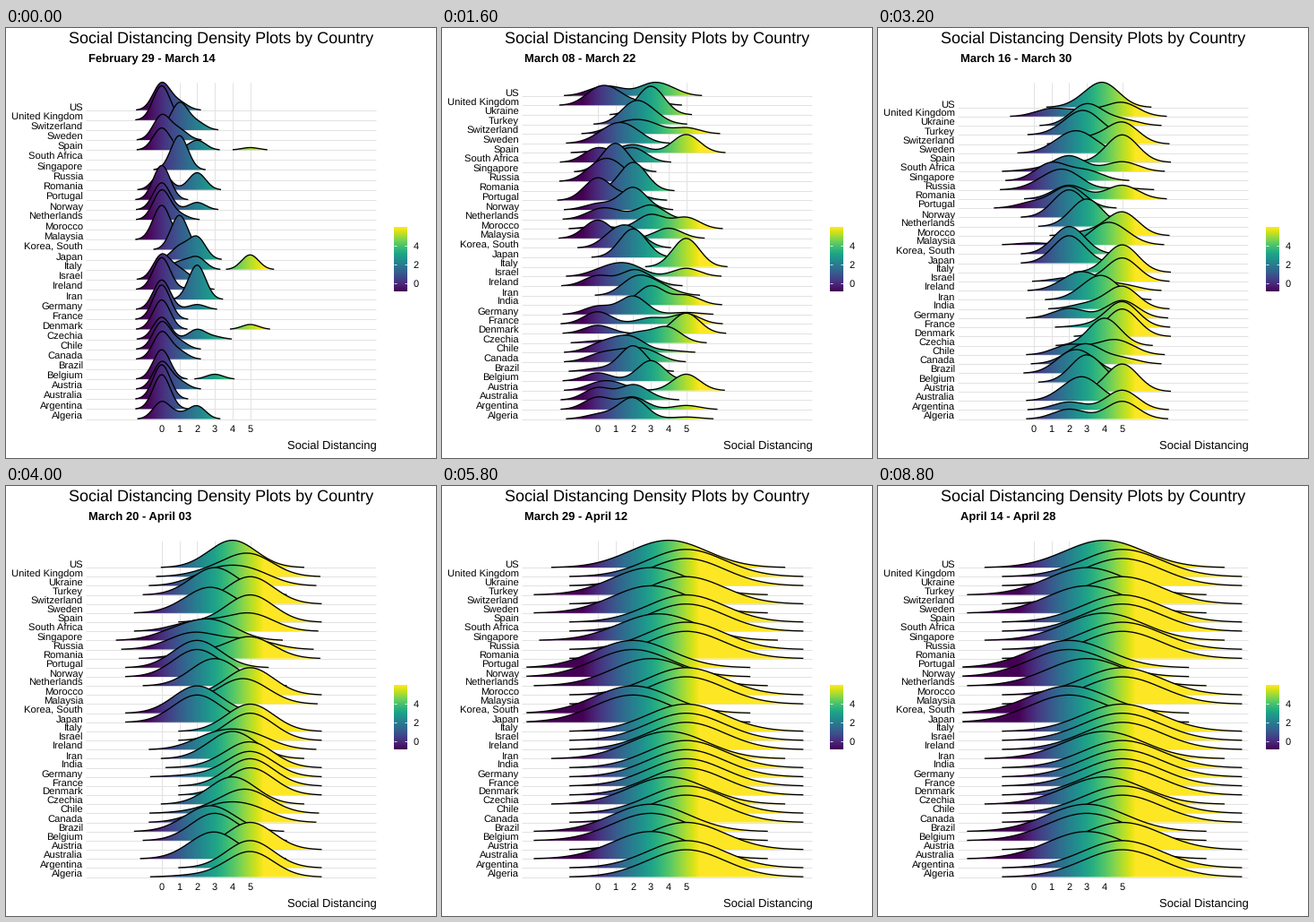
A matplotlib script for the animation above (9 s loop, 480 px wide and 480 px high).

```python
import matplotlib.pyplot as plt
import numpy as np
from matplotlib.animation import FuncAnimation
from matplotlib.path import Path

plt.rcParams["font.family"] = "Liberation Sans"
plt.rcParams["text.hinting"] = "none"

SIZE, DPI = 480, 80
PT = 72 / DPI                       # points per pixel
FRAMES, STEP_MS = 45, 200
WINDOW = 14                         # days in one density window
LAST_DAY = 62
LEFT, RIGHT, TOP, BOTTOM = 89, 413, 60.6, 436.5
X0, UNIT = 173.8, 19.74             # pixel of zero, pixels per level
LOW, HIGH = -0.83, 5.8              # colour limits
OVERLAP, MIN_HEIGHT = 3, 0.01
GRID = "#e2e2e2"

# "day:level" steps, in rows from top to bottom
LEVELS = {
    "US": "0:0 11:1 14:3 19:4",
    "United Kingdom": "0:0 15:1 20:3 23:5",
    "Ukraine": "16:3 27:5",
    "Turkey": "16:2 20:3",
    "Switzerland": "0:1 11:2 15:3 19:5",
    "Sweden": "0:0 10:1 17:2 24:3",
    "Spain": "0:0 9:2 13:5",
    "South Africa": "12:0 17:2 25:5",
    "Singapore": "0:1 25:3 37:4",
    "Russia": "12:0 17:1 22:2 29:5",
    "Romania": "0:0 7:2 23:5",
    "Portugal": "0:0 19:2",
    "Norway": "0:0 11:2",
    "Netherlands": "0:0 12:1 15:3",
    "Morocco": "12:0 13:3 18:5",
    "Malaysia": "0:0 17:4 26:5",
    "Korea, South": "0:1 15:2",
    "Japan": "0:1 5:2",
    "Italy": "0:1 3:2 8:5",
    "Israel": "0:0 10:1 14:2 18:5",
    "Ireland": "0:0 13:2 20:3 27:5",
    "Iran": "0:2 15:3 20:4",
    "India": "19:3 21:5",
    "Germany": "0:0 12:2 21:5",
    "France": "0:0 14:3 17:5",
    "Denmark": "0:0 12:5",
    "Czechia": "0:0 9:2 13:3 15:4",
    "Chile": "0:0 11:1 15:2 21:4 25:5",
    "Canada": "0:0 11:1 14:2 18:3 27:5",
    "Brazil": "12:0 13:2 24:3",
    "Belgium": "0:0 12:3",
    "Austria": "0:0 11:1 14:5",
    "Australia": "0:0 14:2 21:3",
    "Argentina": "0:0 14:2 20:5",
    "Algeria": "6:0 10:1 11:2 21:5",
}


def daily(steps):
    """Level on every day; NaN before the first report."""
    days = np.full(LAST_DAY, np.nan)
    for step in steps.split():
        day, level = map(int, step.split(":"))
        days[day:] = level
    return days


SERIES = [daily(steps) for steps in LEVELS.values()]
XS = np.linspace(-4, 11.9, 420)
PX = X0 + UNIT * XS


def bandwidth(data):
    """Silverman's rule of thumb with fallbacks for constant data."""
    sd = data.std(ddof=1)
    iqr = np.subtract(*np.percentile(data, [75, 25])) / 1.34
    spread = min(sd, iqr) or sd or abs(data[0]) or 1
    return 0.9 * spread * len(data) ** -0.2


def density(data, bw):
    z = (XS[:, None] - data) / bw
    return np.exp(-z * z / 2).mean(axis=1)


def ridges(day):
    """Row numbers on show and the heights, in rows, of those with a curve."""
    windows = {}
    for i, series in enumerate(SERIES):
        data = series[day:day + WINDOW]
        data = data[~np.isnan(data)]
        if len(data):
            windows[i] = data
    drawn = {i: d for i, d in windows.items() if len(d) > 2}
    bw = np.mean([bandwidth(d) for d in drawn.values()])
    heights = {i: density(d, bw) for i, d in drawn.items()}
    peak = max(h.max() for h in heights.values())
    scale = OVERLAP * (len(windows) - 1) / (len(drawn) - 1) / peak
    for i, h in heights.items():
        heights[i] = np.where(h >= MIN_HEIGHT * peak, h * scale, np.nan)
    return list(windows), heights


def day_of(frame):
    return frame + (frame >= 33)    # one day is skipped


def date_text(day):
    if day == 0:
        return "February 29"
    return f"March {day:02d}" if day <= 31 else f"April {day - 31:02d}"


fig = plt.figure(figsize=(SIZE / DPI, SIZE / DPI), dpi=DPI, facecolor="white")
ax = fig.add_axes([0, 0, 1, 1])
ax.axis("off")


def label(x, y, text, px, **style):
    return ax.text(x, y, text, fontsize=px * PT, color="black",
                   va="baseline", **style)


def rule(xs, ys, color=GRID, px=1.0, z=1, cap="butt"):
    return ax.plot(xs, ys, color=color, lw=px * PT, zorder=z,
                   solid_capstyle=cap)[0]


def strip(values):
    """RGB colours for levels, held at both ends of the scale."""
    t = np.clip((values - LOW) / (HIGH - LOW), 0, 1)
    return (plt.get_cmap("viridis")(t)[:, :3] * 255).round().astype(np.uint8)


def picture(pixels, extent, z):
    return ax.imshow(pixels, extent=extent, aspect="auto",
                     interpolation="nearest", zorder=z)


label(240, 16.5, "Social Distancing Density Plots by Country", 18, ha="center")
label(413.7, 470, "Social Distancing", 13, ha="right")
subtitle = label(92, 38, "", 13, weight="bold")

for level in range(6):
    x = X0 + UNIT * level
    rule([x, x], [TOP, BOTTOM])
    label(x, 451, str(level), 11, ha="center")

# colour bar
picture(strip(np.linspace(HIGH, LOW, 72))[:, None], (433, 448, 294, 222), 2)
for level in (0, 2, 4):
    y = 285 - 10.5 * level
    for x in (433, 445):
        rule([x, x + 3], [y, y], "white", 0.8, 3)
    label(454.5, y + 4, str(level), 11)

columns = strip((np.arange(LEFT, RIGHT) + 0.5 - X0) / UNIT)[None]
names, base_lines, fills, curves = [], [], [], []
for i, name in enumerate(LEVELS):
    names.append(label(86, 0, name, 11.25, ha="right"))
    base_lines.append(rule([LEFT, RIGHT], [0, 0]))
    fills.append(picture(columns, (LEFT, RIGHT, 100, 50), 4 + 2 * i))
    curves.append(rule([], [], "black", 1.35, 5 + 2 * i, "projecting"))

ax.set_xlim(0, SIZE)
ax.set_ylim(SIZE, 0)


def draw(frame):
    day = day_of(frame)
    subtitle.set_text(f"{date_text(day)} - {date_text(day + 14)}")
    shown, heights = ridges(day)
    floor = {i: len(shown) - 1 - k for k, i in enumerate(shown)}
    extent = max(floor[i] + np.nanmax(h) for i, h in heights.items())
    gap = (BOTTOM - TOP) / extent
    for i in range(len(SERIES)):
        for artist in (names[i], base_lines[i]):
            artist.set_visible(i in floor)
        for artist in (fills[i], curves[i]):
            artist.set_visible(i in heights)
        if i not in floor:
            continue
        base = BOTTOM - gap * floor[i]
        names[i].set_y(base)
        base_lines[i].set_ydata([base, base])
        if i not in heights:
            continue
        curve = base - gap * heights[i]
        curves[i].set_data(PX, curve)
        edge = np.where(np.isnan(curve), base, curve)
        outline = np.column_stack([PX, edge])
        ends = [(PX[-1], base), (PX[0], base)]
        fills[i].set_extent((LEFT, RIGHT, base + 2, base - 46))
        fills[i].set_clip_path(Path(np.vstack([outline, ends])), ax.transData)
    return []


anim = FuncAnimation(fig, draw, frames=FRAMES, interval=STEP_MS,
                     init_func=lambda: draw(0), repeat=True, repeat_delay=0,
                     blit=False)
plt.show()
```
